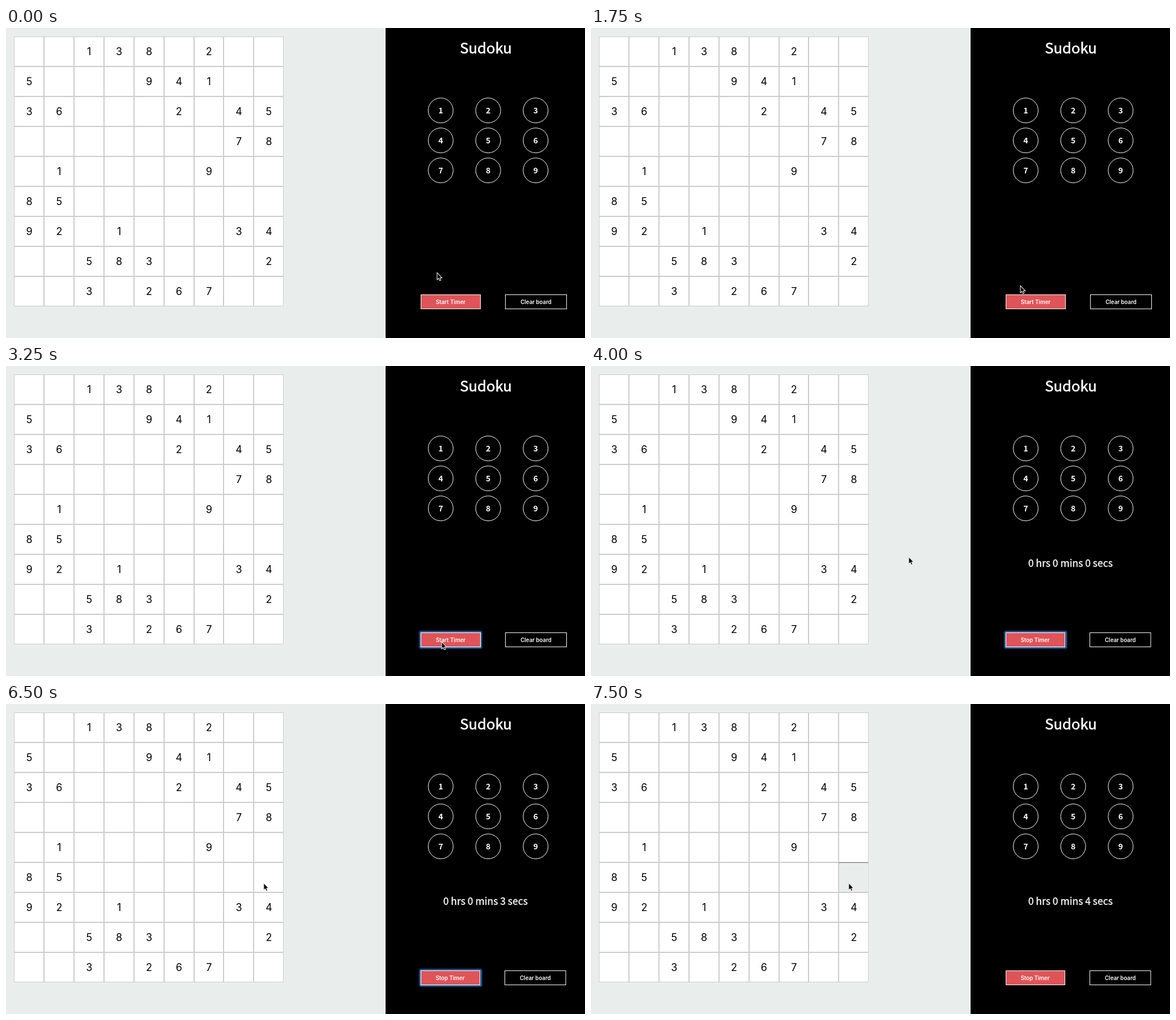
Recreate the animation shown at these times as an HTML page. Size 1022x548 px, loop 8 s.

```html
<!DOCTYPE html>
<html lang="en">
<head>
<meta charset="utf-8">
<title>Sudoku</title>
<style>
  html, body { margin: 0; width: 100%; height: 100%; overflow: hidden; background: #e9eeed; }
  svg { display: block; width: 1022px; height: 548px; }
  text { text-anchor: middle; }
  .cell { fill: #fff; stroke: #ccc; }
  .num { font: 18px Inter, "Liberation Sans", sans-serif; fill: #000; }
  .side text { fill: #fff; font-family: "Noto Sans CJK JP", "Noto Sans CJK SC", "Noto Sans CJK", "Noto Sans", sans-serif; }
  .side .title { font-size: 25.6px; stroke: #fff; stroke-width: .6px; }
  .side .clock { font-size: 17.5px; stroke: #fff; stroke-width: .35px; }
  .side .key { font-size: 14px; font-weight: 700; }
  .side .label { font: 600 9.7px Inter, "Liberation Sans", sans-serif; }
  .outline { fill: none; stroke: #fff; }
  .red { fill: #df5459; stroke: #fff; }
  .ring rect { fill: none; stroke: #2f86d8; }
  .arrow { fill: #000; stroke: #fff; stroke-width: 2px; paint-order: stroke; filter: drop-shadow(0 .8px .7px rgba(0, 0, 0, .35)); }
</style>
</head>
<body>
<svg viewBox="0 0 1022 548">
  <g id="board"></g>
  <g data-from="7000">
    <rect x="437" y="280" width="53" height="53" fill="#e9eeec"/>
    <path d="M437.5 281V332.5H490" fill="none" stroke="#ccc"/>
    <path d="M489.5 281V333" stroke="#ddd"/>
    <path d="M437 280.5H490" stroke="#808080"/>
  </g>
  <g class="side">
    <rect x="670" width="352" height="548"/>
    <text class="title" x="847" y="45">Sudoku</text>
    <g id="keys"></g>
    <g id="clock"></g>
    <g class="ring" data-from="3250" data-to="7000">
      <rect x="730" y="469" width="109.500" height="30" rx="2.500" stroke-width="3.500" opacity=".3"/>
      <rect x="731" y="470" width="107.500" height="28" rx="1.500" stroke-width="2" opacity=".75"/>
    </g>
    <g data-to="3500">
      <rect class="red" x="732.500" y="471.500" width="105" height="25"/>
      <text class="label" x="785" y="487.600">Start Timer</text>
      <rect class="outline" x="881.500" y="471.500" width="108" height="25"/>
      <text class="label" x="935.500" y="487.600">Clear board</text>
    </g>
    <g data-from="3500">
      <rect class="red" x="732.500" y="471.500" width="104" height="25"/>
      <text class="label" x="784" y="487.600">Stop Timer</text>
      <rect class="outline" x="880.500" y="471.500" width="107.500" height="25"/>
      <text class="label" x="934.300" y="487.600">Clear board</text>
    </g>
  </g>
  <g id="cursor"><path class="arrow" d="M1.400 1.800V12L3.800 9.800L5.700 14L7 13.400L5.200 9.300H8.500Z"/></g>
</svg>
<script>
  const LOOP = 8000;
  const $ = id => document.getElementById(id);
  const range = n => [...Array(n).keys()];

  const puzzle = [
    '..138.2..', '5...941..', '36...2.45',
    '.......78', '.1....9..', '85.......',
    '92.1...34', '..583...2', '..3.267..'
  ];
  const edgeX = i => Math.round(14.4 + 52.85 * i);
  const edgeY = i => Math.round(15.2 + 52.93 * i);

  $('board').innerHTML = puzzle.map((row, r) => [...row].map((digit, c) => {
    const x = edgeX(c), y = edgeY(r);
    const rect = `<rect class="cell" x="${x + .5}" y="${y + .5}" width="${edgeX(c + 1) - x - 1}" height="${edgeY(r + 1) - y - 1}"/>`;
    const text = `<text class="num" x="${41 + 52.87 * c}" y="${48.4 + 53 * r}">${digit}</text>`;
    return digit === '.' ? rect : rect + text;
  }).join('')).join('');

  $('keys').innerHTML = range(9).map(i => {
    const x = 767.3 + 83.8 * (i % 3), y = 145.7 + 53 * Math.floor(i / 3);
    return `<circle class="outline" cx="${x}" cy="${y}" r="22"/><text class="key" x="${x}" y="${y + 5.3}">${i + 1}</text>`;
  }).join('');

  $('clock').innerHTML = range(5).map(s => {
    const from = 3500 + 1000 * s;
    return `<text class="clock" x="846.300" y="354.700" data-from="${from}" data-to="${Math.min(from + 1000, LOOP)}">0 hrs 0 mins ${s} secs</text>`;
  }).join('');

  // Hold each [time, style] until the next one.
  function hold(el, steps) {
    const frames = steps.map(([t, style]) => ({ ...style, offset: t / LOOP, easing: 'step-end' }));
    frames.push({ ...steps[steps.length - 1][1], offset: 1 });
    el.animate(frames, { duration: LOOP, iterations: Infinity });
  }

  for (const el of document.querySelectorAll('[data-from], [data-to]')) {
    const from = +(el.dataset.from || 0), to = +(el.dataset.to || LOOP);
    const steps = [[from, { opacity: 1 }]];
    if (from > 0) steps.unshift([0, { opacity: 0 }]);
    if (to < LOOP) steps.push([to, { opacity: 0 }]);
    hold(el, steps);
  }

  const path = [
    [0, 760, 432], [250, 777, 479], [500, 780, 482], [1000, 769, 487],
    [1250, 768, 487], [1500, 762, 479], [1750, 757, 455], [2250, 766, 487],
    [2500, 768, 487], [3750, 763, 483], [4000, 560, 337], [4750, 331, 146],
    [5000, 342, 158], [5250, 420, 227], [5500, 448, 261], [5750, 450, 263],
    [6000, 450, 302], [6250, 454, 316]
  ];
  hold($('cursor'), path.map(([t, x, y]) => [t, { transform: `translate(${x}px, ${y}px)` }]));
</script>
</body>
</html>
```
